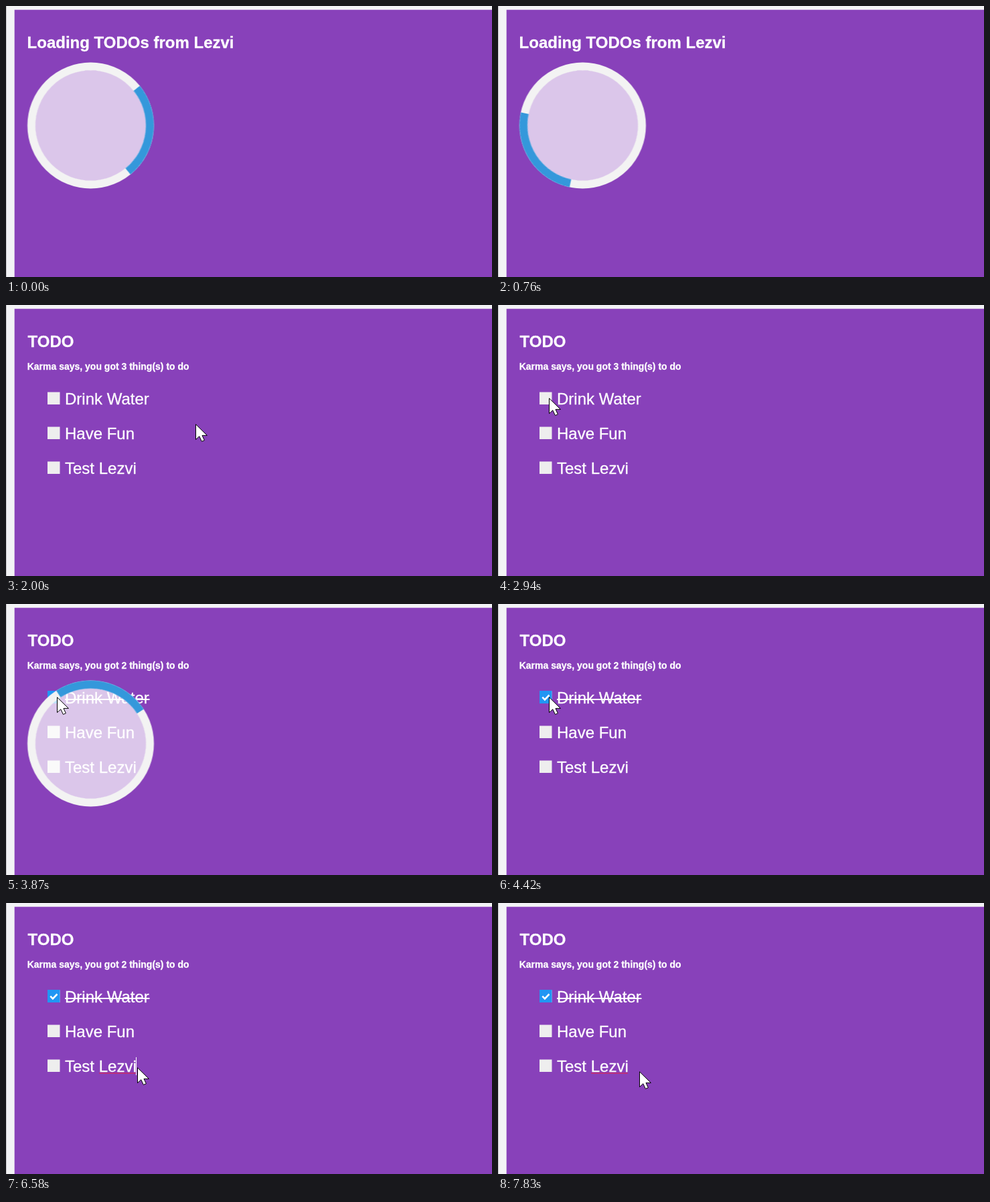
Write an HTML page that moves like this. It is 726 px wide and 406 px high and loops after 8 s.

```html
<!DOCTYPE html>
<html lang="en">
<head>
<meta charset="utf-8">
<title>Todo list</title>
<style>
  html, body { margin: 0; width: 100%; height: 100%; overflow: hidden; background: #f3f3f6; }
  svg { display: block; width: 726px; height: 406px; }
  text { font: 24px "Liberation Sans", Arial, sans-serif; fill: #fff; stroke: #fff; stroke-width: .3px; }
  .title { font-weight: bold; }
  .sub { font-weight: bold; font-size: 14px; }
  .box { fill: #eee; }
  #loading, #list, #done, #two, #loader, #caret, #spell, #cursor { opacity: 0; }
</style>
</head>
<body>
<svg viewBox="0 0 726 406">
  <rect width="1" height="406" fill="#c6c6ca"/>
  <rect x="12.7" y="5.7" width="714" height="401" fill="#8841ba"/>

  <text id="loading" class="title" x="31.6" y="63">Loading TODOs from Lezvi</text>

  <g id="list">
    <text class="title" x="32.6" y="63">TODO</text>
    <text id="three" class="sub" x="31.7" y="97">Karma says, you got 3 thing(s) to do</text>
    <text id="two" class="sub" x="31.7" y="97">Karma says, you got 2 thing(s) to do</text>
    <rect class="box" x="62" y="130.5" width="18.5" height="18.5"/>
    <rect class="box" x="62" y="182.5" width="18.5" height="18.5"/>
    <rect class="box" x="62" y="234.5" width="18.5" height="18.5"/>
    <text x="88" y="149">Drink Water</text>
    <text x="88" y="201">Have Fun</text>
    <text x="88" y="253">Test Lezvi</text>
    <g id="done">
      <rect x="62" y="130" width="18.5" height="19" fill="#2196f3"/>
      <path d="M66.3 139.7l3.6 3.6 6.6-6.8" fill="none" stroke="#fff" stroke-width="2.6"/>
      <rect x="88" y="142" width="126.5" height="2" fill="#fff"/>
    </g>
    <rect id="spell" x="139" y="254" width="55" height="2" fill="#bb2f7c"/>
    <rect id="caret" x="194" y="231" width="1" height="27" fill="#fff"/>
  </g>

  <g id="loader">
    <circle r="83" fill="#fff" fill-opacity=".7"/>
    <circle r="88.5" fill="none" stroke="#f3f3f3" stroke-width="12"/>
    <circle id="arc" r="88.5" fill="none" stroke="#3498db" stroke-width="12" pathLength="360" stroke-dasharray="90 270"/>
  </g>

  <path id="cursor" d="M.5.8V23.6L5.8 18.7 9.4 26.4 13.4 24.7 10 17.4H17.4Z" fill="#fff" stroke="#000"/>
</svg>
<script>
const LOOP = 8000, TICK = 76;

// Holds each [time, value] until the next one.
function hold(id, prop, steps) {
  const frames = steps.map(([t, v]) => ({ offset: t / LOOP, [prop]: v, easing: 'step-end' }));
  frames.push({ offset: 1, [prop]: steps.at(-1)[1] });
  document.getElementById(id).animate(frames, { duration: LOOP, iterations: Infinity });
}

// Starts from the first state and flips at every given time.
function toggle(id, on, ...times) {
  hold(id, 'opacity', [0, ...times].map((t, i) => [t, (i % 2 ? !on : on) ? 1 : 0]));
}

const move = (x, y) => `translate(${x}px, ${y}px)`;
const ease = p => p * p * (3 - 2 * p);
const bend = (a, b, c, p) => Math.round((1 - p) ** 2 * a + 2 * p * (1 - p) * b + p * p * c);

// The ring turns at an even rate, redrawn once per tick.
const spin = (start, angle, count) =>
  Array.from({ length: count }, (_, i) => [start + i * TICK, `rotate(${angle + 14.1 * i}deg)`]);

// Eased curve from one point to another, redrawn about once per tick.
function glide({ from, to, a, via, b }) {
  const count = Math.round((to - from) / TICK) + 1;
  return Array.from({ length: count }, (_, i) => {
    const p = ease((i + 1) / count);
    const at = k => bend(a[k], via[k], b[k], p);
    return [from + i * (to - from) / (count - 1), move(at(0), at(1))];
  });
}

toggle('loading', true, 1390);
toggle('list', false, 1390);
toggle('three', true, 3870);
toggle('two', false, 3870);
toggle('done', false, 3870);
toggle('loader', true, 1390, 3870, 4420);
toggle('spell', false, 6350);
toggle('caret', false, 6350, 6740, 7280, 7830);
toggle('cursor', false, 2000);

hold('loader', 'transform', [[0, move(126.5, 179)], [1390, move(126.5, 209)]]);
hold('arc', 'transform', [...spin(0, -39, 18), ...spin(3870, -123, 7)]);

const enter = [283, 178], rest = [225, 134], check = [76, 139], turn = [220, 255],
      word = [195, 243], click = [191, 243], end = [211, 252];
hold('cursor', 'transform', [
  [0, move(...enter)],
  [2080, move(...rest)],
  ...glide({ from: 2400, to: 2940, a: rest, via: [150, 121], b: check }),
  ...glide({ from: 5350, to: 5580, a: check, via: [148, 208], b: turn }),
  ...glide({ from: 5660, to: 5890, a: turn, via: [192, 260], b: word }),
  ...glide({ from: 6040, to: 6200, a: word, via: click, b: click }),
  ...glide({ from: 6500, to: 6900, a: click, via: [200, 249], b: end })
]);
</script>
</body>
</html>
```
